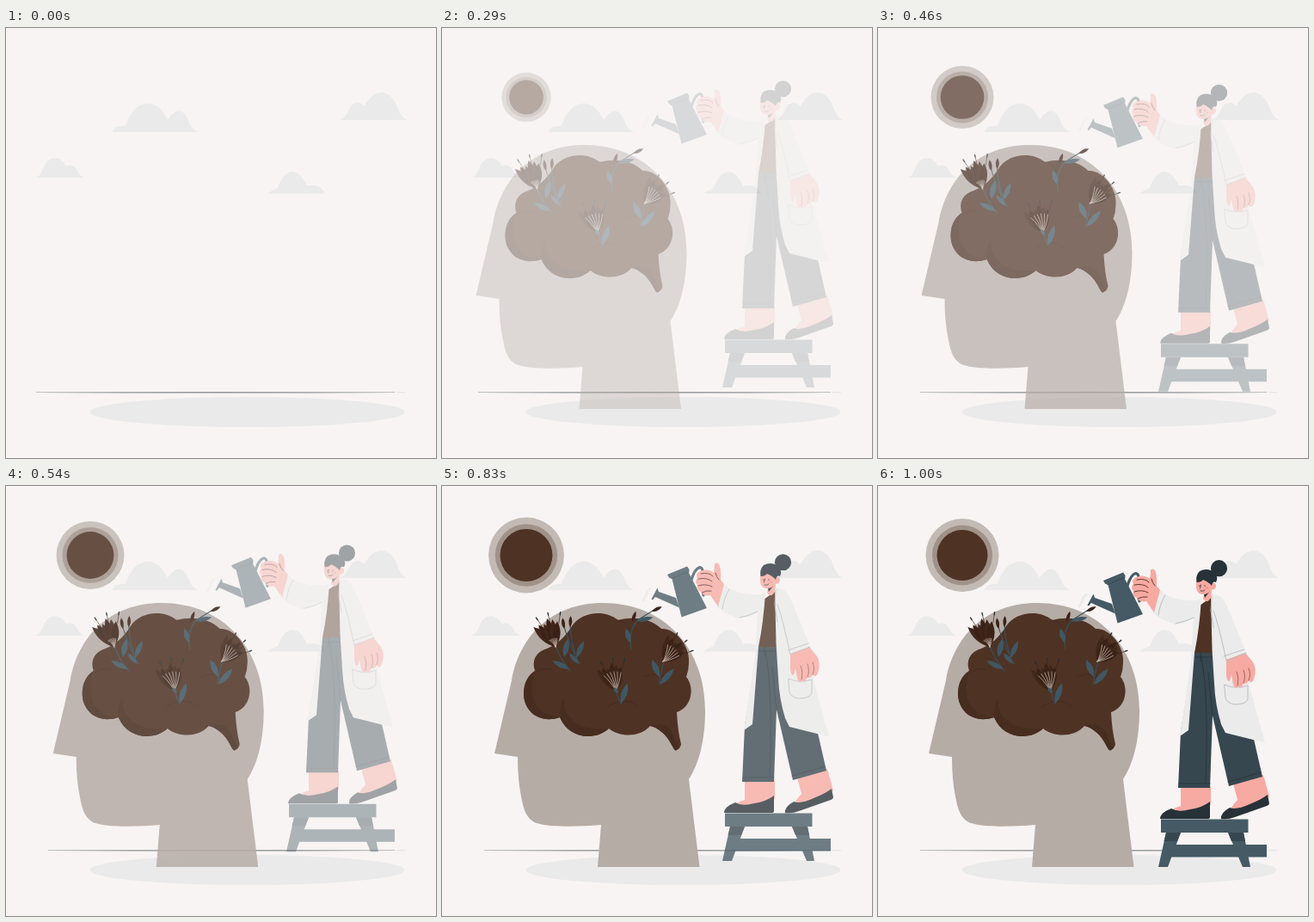
Recreate the animation shown at these times as an HTML page. Size 500x500 px, loop 1.04 s.

```html
<!DOCTYPE html>
<html lang="en">
<head>
<meta charset="utf-8">
<title>Watering the mind</title>
<style>
html, body { margin: 0; width: 100%; height: 100%; overflow: hidden; background: #f7f4f3; }
svg { display: block; width: 100vw; height: 100vh; }
.line { fill: none; stroke-linecap: round; stroke-linejoin: round; }
</style>
</head>
<body>
<svg viewBox="0 0 500 500">
  <rect width="500" height="500" fill="#f7f4f3"/>
  <g fill="#eaeaea">
    <path d="M34 174Q40 173 43 164C48 148 63 147 70 161C77 157 81 162 84 168Q86 172 91 174Z"/>
    <path d="M124 121Q125 113 139 114C148 83 175 78 188 107C197 93 207 92 213 110Q215 117 223 121Z"/>
    <path d="M304 192.500Q311 188 316 186C324 163 340 160 350 184Q365 180 371 192.500Z"/>
    <path d="M388 107Q395 104 398 97C402 86 410 84 417 91C428 69 447 70 455 92Q458 103 466 107Z"/>
    <ellipse cx="280.500" cy="446.500" rx="183" ry="17.500"/>
  </g>
  <path id="floor" fill="#263238"/>
  <path d="M454 423.800h10" stroke="#e4e3e3"/>

  <g id="sun">
    <circle r="42.500" fill="#c3bab4"/>
    <circle r="35" fill="#a09289"/>
    <circle r="29.500" fill="#4e3324"/>
  </g>

  <g id="head">
    <path fill="#b6aca6" d="M179 443L183 394C160 396 128 397 112 393C96 390 93 376 90 361Q86 342 86 315L59 311L79 226C88 175 125 136 185 136C258 136 304 190 304 261C304 295 297 323 285 341L297.500 443Z"/>
    <path fill="#4e3324" d="M93 241C93 229 98 220 106 215C102 203 107 193 120 189C132 184 141 176 149 163C160 146 187 143 203 156C219 151 242 154 253 166C270 165 287 187 285 206Q285 214 282 222C292 234 289 257 271 263Q272 284 276 300Q276 304 270 307.500C267 308 263 292 252 285Q246 280 240 279C228 293 204 292 192 282C177 296 146 295 135 269C111 277 93 262 93 241Z"/>
    <g fill="#472d1f">
      <path d="M93 241C93 262 111 277 135 269Q113 268 105 250Q99 233 106 215Q94 223 93 241Z"/>
      <path d="M135 269C146 295 177 296 192 282Q162 285 149 271Q138 262 140 246Q134 255 135 269Z"/>
      <path d="M240 279Q262 272 268 294L274 305L270 307.500C267 308 263 292 252 285Q246 280 240 279Z"/>
    </g>
    <g class="line" stroke="#452b20">
      <path d="M108 216Q117 210 126 214M203 156Q212 158 216 166M232 222Q247 214 261 224M190 257Q213 243 226 257"/>
    </g>
    <g id="flowers"></g>
  </g>

  <g id="woman">
    <g fill="#455a64">
      <path d="M339 417H452V431.500H334Z"/>
      <path d="M335 403H352L337 443H326ZM407 403H425L433 443H424Z"/>
      <path d="M335 403H352L348 413H332.500ZM407 403H425L427 413H411Z" fill="#37474f"/>
      <path d="M329 387.500H430.500V403H329Z"/>
    </g>

    <g fill="#f7aaa2">
      <path d="M352 349H387V371Q366 384 339 382Q340 375 352 372Z"/>
      <path d="M413 346L448 336L455 361Q431 378 408 382Q409 374 418 365Z"/>
    </g>
    <g fill="#263238">
      <path d="M328 387Q328 380 341 375Q349 380 363 376Q377 374 386 367V385Q386 387 383 387Z"/>
      <path d="M399 387Q398 380 409 374Q417 377 432 370Q445 365 453 359L455 369Q455 371 452 372L415 385Q407 388 399 387Z"/>
    </g>
    <path fill="#37474f" d="M367 193H389L404 250L436 290L447 338L408 349L389 267L386 351H349L352 286Z"/>
    <g class="line" stroke="#263238" stroke-width=".8">
      <path d="M376 199Q385 245 381 345M389 267L384 217M350 346H386M407 344L445 333M367 199H388M375 194V204"/>
    </g>
    <path fill="#4e3324" d="M374 139L388 129L389.500 194H367.500Q371 165 371 145Z"/>

    <g fill="#ebebeb">
      <path d="M328 121Q342 135 372 133L376 130Q374 165 368 194L361 284L351 291L364 205L367 154C357 159 346 163 340 159Q328 155 319 147Z"/>
      <path d="M387 125Q399 126 403 134Q410 148 428 194L424 204L450 298.500L404 287L399 277Q392 254 391 230L388.500 190Z"/>
    </g>
    <path fill="#f7aaa2" d="M405 202L427 194L436 205Q441 213 437 225Q434 231 431 226Q428 232 425 229Q421 238 418 232Q415 238 413 230L411 219Q408 234 405 221Z"/>
    <g class="line" stroke="#b7babb" stroke-width=".9">
      <path d="M390 145Q396 160 405 203L428 194M402 198L426 190M334 127Q328 136 326 150M388 128L387 145L390 165M346 160Q357 158 367 153"/>
      <path fill="#ebebeb" d="M403 231Q416 237 430 232V248Q428 254 414 254Q405 252 404 246Z"/>
    </g>
    <path fill="#f7aaa2" d="M412 222L418 221L419 232Q416 238 413 230ZM419 222H425V229Q422 237 419 233Z"/>
    <path class="line" stroke="#8d4e4a" stroke-width=".8" d="M417 216Q420 223 418 232M425 214Q428 222 425 229M431 212Q434 219 431 226"/>

    <path fill="#f7aaa2" d="M371 108C368 119 371 127 379 126L378 131Q382 138 387 130L388 121Q394 120 393 115Q390 110 387 114L385 105Z"/>
    <path fill="#263238" d="M370.500 112Q369 104 374 99Q383 94 392 101Q396 107 393 112Q389 110 388 116Q385 112 378 109Q376 112 370.500 112Z"/>
    <circle cx="396.500" cy="95.700" r="9.600" fill="#263238"/>
    <g class="line" stroke="#263238" stroke-width=".8">
      <path d="M374 115.500V116.500M380 115.500V116.500M375.500 115L374.500 119M375 122Q378 123 380 121"/>
      <path d="M379 126Q383 126 386 122L380 130Z" fill="#263238" stroke="none"/>
    </g>
    <path d="M381 118.500h3" stroke="#ee8982" stroke-width="1.500"/>

    <g stroke="#455a64">
      <path class="line" stroke-width="3.200" d="M289 119Q294 102 300 101.500Q305 103 302 113L304 134"/>
      <path fill="#455a64" stroke="none" d="M262 110L285 100.500L287.500 104L287 108L308 149L278.500 159.500L267.500 115L264 113.500Z"/>
      <path fill="#455a64" stroke="none" d="M250.500 125.500L252 130L272 137L276 148.500L248 136L245 139.500L243.500 138.500Z"/>
      <path class="line" stroke="#37474f" d="M267 114.500L287 106.500"/>
    </g>
    <path class="line" stroke="#e9eaea" stroke-width="2.500" d="M242 126L238 131M238 133L234 140"/>
    <path fill="#f7aaa2" d="M328 121L324 116Q325 100 321 97Q316 95 317 102L316 108Q309 102 300 106Q294 109 297 114Q293 118 297 122Q295 128 301 130Q305 136 312 134L321 147Z"/>
    <path class="line" stroke="#613632" stroke-width="1" d="M301 109Q311 107 315 112M298 115Q309 113 314 118M298 123Q307 120 314 124M302 131Q308 128 313 129M318 108Q319 113 322 116"/>
  </g>
</svg>

<script>
const FRAME = 1000 / 24, LOOP = 1040, LAST = 24;
const el = id => document.getElementById(id);
const clamp = (x, low, high) => Math.max(low, Math.min(high, x));

const leaf = (x, y, angle, length, width, fill = '#3f5763') =>
  `<path transform="translate(${x} ${y}) rotate(${angle})" fill="${fill}"
    d="M0 0Q${width} ${-length / 2} 0 ${-length}Q${-width} ${-length / 2} 0 0"/>`;

const stem = (d, color = '#37505d', width = 1.1) =>
  `<path class="line" d="${d}" stroke="${color}" stroke-width="${width}"/>`;

// A fan of broad petals between two angles, with pale filaments and dark stamens.
function bloom(x, y, from, to, length, filament) {
  let petals = '', threads = '';
  for (let i = 0; i < 6; i++) {
    const angle = from + (to - from) * i / 5;
    const reach = length * (0.92 + 0.08 * Math.sin(i * 2.1 + 1));
    petals += leaf(x, y, angle, reach, 9, i % 2 ? '#3a2218' : '#412719');
    threads += `<g transform="translate(${x} ${y}) rotate(${angle + 4})">
      ${stem(`M0 0Q2 -8 0 ${-filament}`, '#c5b5ab', 0.7)}
      ${i % 2 ? stem(`M0 ${-length * 0.8}V${-length * 1.1}`, '#3a2218', 0.6) +
        stem(`M0 ${-length * 1.08}V${-length * 1.16}`, '#263238', 1.4) : ''}</g>`;
  }
  return petals + threads;
}

el('flowers').innerHTML =
  stem('M130 186Q136 202 147 215M139 159Q143 178 158 207M147 158Q147 177 153 195M218 190Q214 166 227 155L248 142M256 203L250 230M199 236L206 253') +
  bloom(130, 187, -48, 4, 35, 10) + bloom(255, 204, 12, 66, 32, 20) + bloom(200, 238, -42, 12, 33, 22) +
  [[140, 199, 12, 22, 7], [146, 213, -64, 22, 6], [154, 200, 24, 22, 6], [157, 207, -42, 17, 5],
   [217, 182, -18, 17, 6], [224, 157, 78, 20, 5], [251, 222, -24, 22, 7], [251, 231, 42, 25, 7],
   [206, 253, 18, 25, 7], [203, 241, -38, 9, 4]].map(a => leaf(...a)).join('') +
  [[140, 166, -8, 13, 4], [147, 164, 3, 13, 4], [219, 158, 20, 13, 4], [242, 146, 64, 13, 4]]
    .map(a => leaf(...a, '#3a2218')).join('');

const SETTLE = [[2, 0], [7, 0.35], [11, 0.717], [16, 1.017], [20, 1.067], [24, 1]];

// Smooth curve through a few [position, value] knots.
function curve(knots, x) {
  const last = knots.length - 1;
  const at = i => knots[clamp(i, 0, last)];
  const slope = i => (at(i + 1)[1] - at(i - 1)[1]) / (at(i + 1)[0] - at(i - 1)[0]);
  x = clamp(x, knots[0][0], knots[last][0]);
  let i = 0;
  while (i < last - 1 && x > knots[i + 1][0]) i++;
  const [x0, y0] = knots[i], [x1, y1] = knots[i + 1];
  const w = x1 - x0, u = (x - x0) / w, v = 1 - u;
  return v * v * (1 + 2 * u) * y0 + u * u * (3 - 2 * u) * y1 +
    w * u * v * (v * slope(i) - u * slope(i + 1));
}

function draw(time) {
  const step = Math.min(LAST, Math.floor((time % LOOP + 4) / FRAME));
  const fade = clamp((step - 2) / 13, 0, 1);
  const settle = curve(SETTLE, step);
  const arrival = (step / LAST) ** 1.45;

  el('head').setAttribute('opacity', fade);
  el('head').setAttribute('transform', `translate(${30 * (settle - 1)} 0)`);
  el('sun').setAttribute('opacity', fade);
  el('sun').setAttribute('transform', `translate(98 80.5) scale(${0.5 + 0.5 * settle})`);
  el('woman').setAttribute('opacity', step < 3 ? 0 : arrival);
  el('woman').setAttribute('transform', `translate(0 ${30 * (arrival - 1)})`);

  const left = 35 + 14 * clamp((step - 3) / 8, 0, 1);
  el('floor').setAttribute('d', `M${left} 423.75Q244 423.1 452 423.75V424Q244 424.5 ${left} 424Z`);
}

const start = performance.now();
function tick(now) {
  draw(Math.max(0, now - start));
  requestAnimationFrame(tick);
}
tick(start);
</script>
</body>
</html>
```
